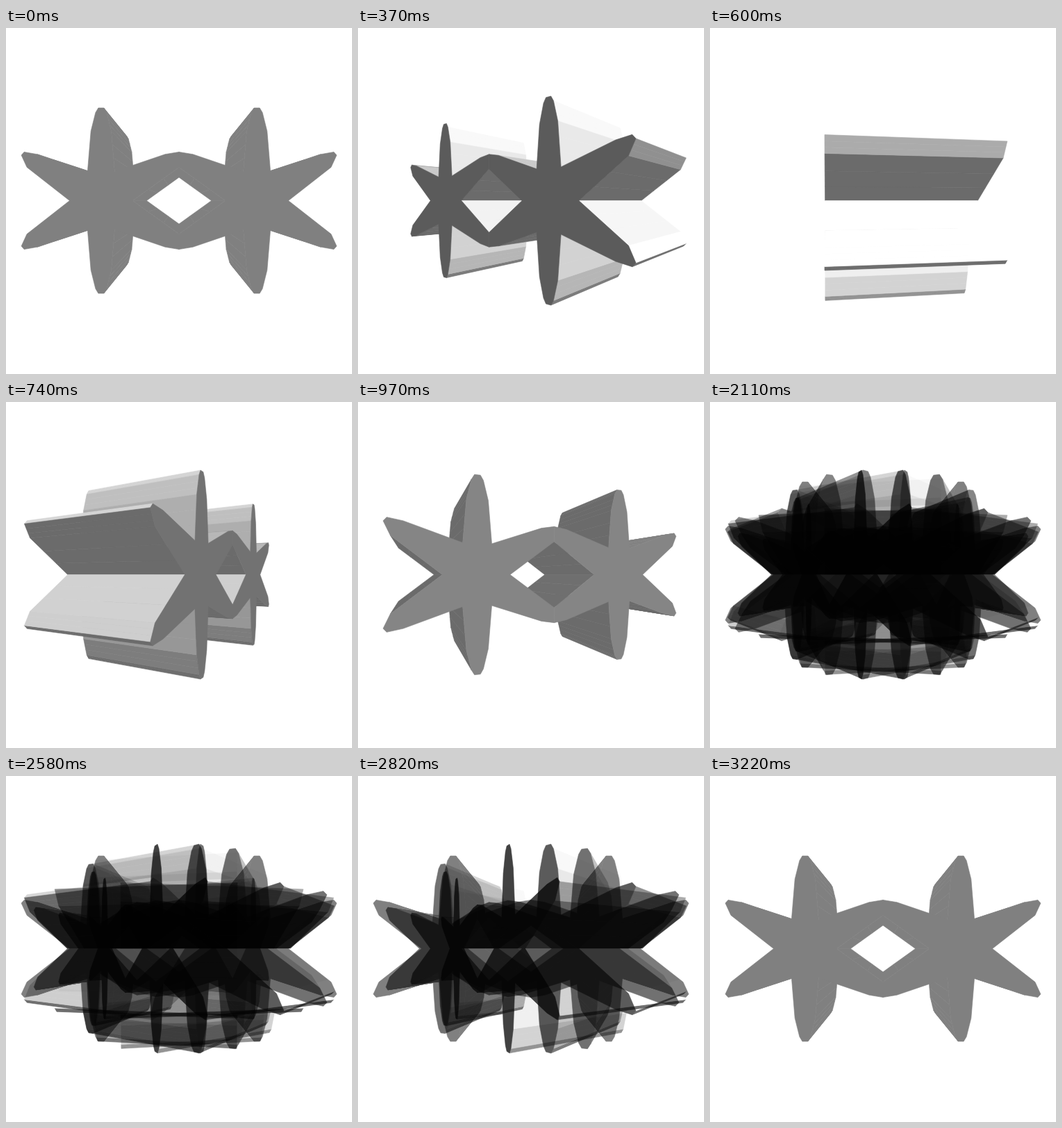
These frames come from a looping animation (498x498 px, 3420 ms). An HTML page with a canvas:

```html
<!DOCTYPE html>
<html lang="en">
<head>
<meta charset="utf-8">
<title>Turning star prisms</title>
<style>
  html, body { margin: 0; width: 100%; height: 100%; overflow: hidden; background: #fff; }
  canvas { display: block; width: 498px; height: 498px; }
</style>
</head>
<body>
<canvas id="stage" width="498" height="498"></canvas>
<script>
const SIZE = 498, CX = 249, CY = 248.5;
const HALF_GAP = 0.84;   // star centre to the joint
const HALF_LENGTH = 0.74; // half the prism depth
const FOCAL = 456, EYE = 4.156;
const LIGHT = [0.35, 0.54, 0.94];
const STARTS = [0, 200, 370, 500, 600, 670, 740, 840, 970];
const PASS = 1140, LOOP = 3420;

// One quadrant of the star, anticlockwise from the right notch to the top.
const QUADRANT = [[0.34, 0], [0.8, 0.36], [0.86, 0.49], [0.83, 0.525], [0.69, 0.5],
  [0.146, 0.315], [0.11, 0.75], [0.06, 0.95], [0.03, 1]];

function starOutline(side) {
  const mirrored = (sx, sy) => QUADRANT.map(([x, y]) => [sx * x, sy * y]);
  const q1 = mirrored(1, 1);
  const q2 = mirrored(-1, 1).reverse();
  const q3 = mirrored(-1, -1).slice(1);
  const q4 = mirrored(1, -1).reverse().slice(0, -1);
  // Inner arms stop where the two stars meet.
  return [...q1, ...q2, ...q3, ...q4].map(([x, y]) => {
    let px = x + side * HALF_GAP;
    if (side * px < 0.06 && Math.abs(y) < 0.6) px = 0;
    return [px, y];
  });
}

const stars = [starOutline(-1), starOutline(1)];

function splitEdges(outline, parts = 3) {
  const edges = [];
  outline.forEach((a, i) => {
    const b = outline[(i + 1) % outline.length];
    if (a[0] === 0 && b[0] === 0) return;
    const at = k => [a[0] + (b[0] - a[0]) * k / parts, a[1] + (b[1] - a[1]) * k / parts];
    for (let k = 0; k < parts; k++) edges.push([at(k), at(k + 1)]);
  });
  return edges;
}

const edges = stars.flatMap(s => splitEdges(s));
const clamp = (v, lo, hi) => Math.min(hi, Math.max(lo, v));
const dot = (a, b) => a[0] * b[0] + a[1] * b[1] + a[2] * b[2];

function renderPose(index) {
  const angle = index * Math.PI / 9;
  const c = Math.cos(angle), s = Math.sin(angle);
  const canvas = document.createElement('canvas');
  canvas.width = canvas.height = SIZE;
  const g = canvas.getContext('2d');
  g.fillStyle = '#fff';
  g.fillRect(0, 0, SIZE, SIZE);
  g.lineWidth = 0.6;
  g.lineJoin = 'round';

  const turn = ([x, y, z]) => [x * c - z * s, y, x * s + z * c];
  const project = p => {
    const [x, y, z] = turn(p);
    const k = FOCAL / (EYE - z);
    return [CX + x * k, CY - y * k];
  };
  const paint = (points, shade) => {
    const v = Math.round(255 * shade);
    g.fillStyle = g.strokeStyle = `rgb(${v},${v},${v})`;
    g.beginPath();
    points.forEach(p => g.lineTo(...project(p)));
    g.closePath();
    g.fill();
    g.stroke();
  };

  const eyeX = EYE * s, eyeZ = EYE * c;
  edges.map(([a, b]) => {
    const dx = b[0] - a[0], dy = b[1] - a[1], len = Math.hypot(dx, dy);
    const normal = [dy / len, -dx / len, 0];
    const mx = (a[0] + b[0]) / 2, my = (a[1] + b[1]) / 2;
    return { a, b, normal,
      facing: normal[0] * (eyeX - mx) - normal[1] * my,
      distance: Math.hypot(eyeX - mx, my) };
  })
    .filter(f => f.facing > 0)
    .sort((f, h) => h.distance - f.distance)
    .forEach(({ a, b, normal }) => {
      const lit = clamp(dot(turn(normal), LIGHT), 0.42, 1);
      paint([[...a, HALF_LENGTH], [...b, HALF_LENGTH], [...b, -HALF_LENGTH], [...a, -HALF_LENGTH]],
        index ? lit : 0.5);
    });

  if (Math.abs(eyeZ) > HALF_LENGTH) {
    const end = Math.sign(eyeZ);
    const shade = 0.2 + 0.32 * Math.max(0, dot(turn([0, 0, end]), LIGHT));
    stars.forEach(star => paint(star.map(([x, y]) => [x, y, end * HALF_LENGTH]), shade));
  }
  return canvas;
}

const poses = STARTS.map((_, i) => renderPose(i));
const stage = document.getElementById('stage').getContext('2d');

// Turn once, then pile up every pose, then take them away in reverse.
function visiblePoses(t) {
  if (t < PASS) {
    const i = STARTS.filter(v => v <= t).length;
    return [i - 1, i];
  }
  if (t < 2 * PASS) return [0, STARTS.filter(v => v <= t - PASS).length];
  return [0, STARTS.filter(v => v < LOOP - t).length];
}

let shown = '';
function draw(t) {
  const [from, to] = visiblePoses(t);
  const key = from + ':' + to;
  if (key === shown) return;
  shown = key;
  stage.globalCompositeOperation = 'source-over';
  stage.fillStyle = '#fff';
  stage.fillRect(0, 0, SIZE, SIZE);
  stage.globalCompositeOperation = 'multiply';
  poses.slice(from, to).forEach(p => stage.drawImage(p, 0, 0));
}

const begin = performance.now();
function tick() {
  draw((performance.now() - begin) % LOOP);
  requestAnimationFrame(tick);
}
tick();
</script>
</body>
</html>
```
